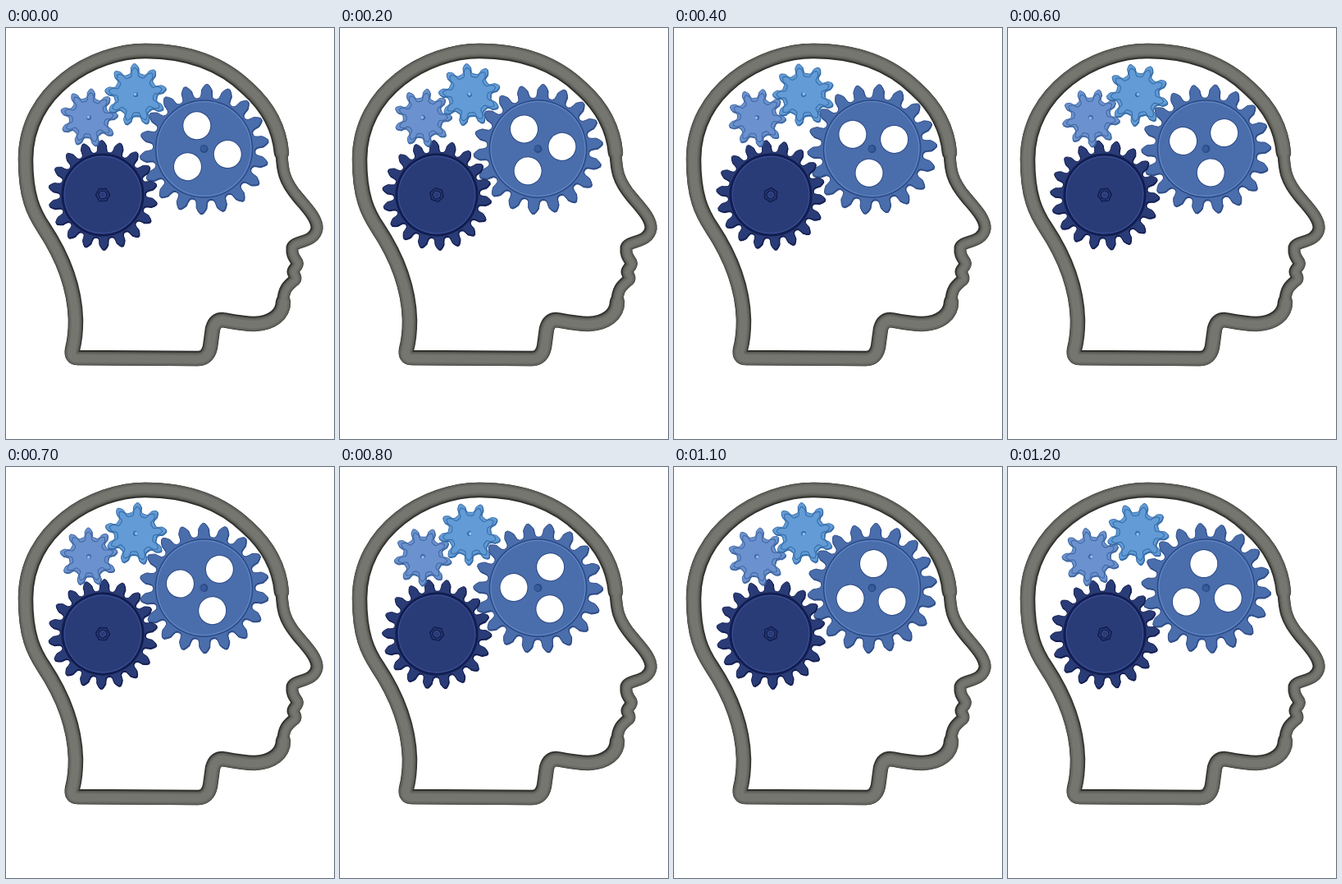
Write an HTML page with a canvas that moves like this. It is 400 px wide and 500 px high and loops after 1.3 s.

```html
<!DOCTYPE html>
<html lang="en">
<head>
<meta charset="utf-8">
<title>Thinking gears</title>
<style>
html, body { margin: 0; width: 100%; height: 100%; overflow: hidden; background: #fff; }
canvas { display: block; }
</style>
</head>
<body>
<canvas width="400" height="500"></canvas>
<script>
const ctx = document.querySelector('canvas').getContext('2d');
const LOOP = 1300, STEP = 100, TAU = Math.PI * 2;
const rad = deg => deg * Math.PI / 180;

const skull = new Path2D(`M338 333 C338 348 325 359 303 360 C290 360 280 358 264 355
  Q255 355 252 366 L249 388 Q246 402 234 402 L88 401 Q79 401 81 391
  C84 380 85 370 85 355 C84 318 72 282 46 243 C34 225 24 205 24 160
  C24 76 106 28 170 28 C220 28 262 42 295 74 C315 92 333 118 336 152`);
const face = new Path2D(`M336 152 C337 172 338 185 356 206 C366 218 380 232 379 244
  C376 262 352 258 349 267 C348 276 352 280 355 285 C357 290 349 293 350 297
  C351 301 356 304 350 308 C344 313 338 318 338 333`);

// Half of a tooth: share of the pitch, share of the tooth height.
const profile = [[.42, 0], [.31, .12], [.27, .35], [.25, .6], [.15, .83], [.05, 1]];
const tooth = [...profile.map(([a, h]) => [-a, h]), ...profile.slice().reverse()];

function outline({ n, fat }, root, tip) {
  const path = new Path2D();
  for (let i = 0; i < n; i++) {
    for (const [a, h] of tooth) {
      const angle = (i + a * fat) / n * TAU, r = root + (tip - root) * h;
      path.lineTo(r * Math.sin(angle), -r * Math.cos(angle));
    }
  }
  path.closePath();
  return path;
}

// Phases and turns per step are in degrees, clockwise from the top.
const gears = [
  { x: 241.5, y: 147, n: 18, fat: 1, root: 62, tip: 78.6, phase: 2.6, turn: -9,
    fill: '#4a6dab', edge: '#2c4a85', light: '#638ac8', detail: bigFace },
  { x: 118, y: 203, n: 18, fat: 1, root: 52, tip: 66.3, phase: -1.1, turn: 9,
    fill: '#2a3c77', edge: '#121d50', light: '#3b519a', detail: darkFace },
  { x: 101, y: 109, n: 9, fat: .82, root: 24, tip: 35, phase: 5, turn: -18,
    fill: '#6b92cf', edge: '#3d659f', light: '#8db2e6', detail: smallFace },
  { x: 158, y: 81, n: 9, fat: .82, root: 26, tip: 37.5, phase: -2, turn: 18,
    fill: '#629bd5', edge: '#336aa6', light: '#86bcec', detail: smallFace }
];
for (const g of gears) {
  g.path = outline(g, g.root, g.tip);
  g.rim = outline(g, g.root - 4, g.tip - 5);
}

function stroke(color, width, path) {
  ctx.strokeStyle = color;
  ctx.lineWidth = width;
  path ? ctx.stroke(path) : ctx.stroke();
}

function disc(x, y, r, color) {
  ctx.beginPath();
  ctx.arc(x, y, r, 0, TAU);
  ctx.fillStyle = color;
  ctx.fill();
}

function ring(r, color, width) {
  ctx.beginPath();
  ctx.arc(0, 0, r, 0, TAU);
  stroke(color, width);
}

function bigFace(g) {
  ring(59, g.edge, 1.5);
  ring(57.3, g.light, 1);
  for (let i = 0; i < 3; i++) {
    const a = rad(-19.8 + i * 120), x = 29.5 * Math.sin(a), y = -29.5 * Math.cos(a);
    disc(x, y, 17.5, g.edge);
    disc(x, y, 16.5, '#fff');
  }
  disc(0, 0, 5, g.edge);
  disc(-.5, -.5, 3.5, '#365b9c');
}

function darkFace(g) {
  ring(49, g.edge, 3);
  ring(46.8, g.light, 1);
  ctx.beginPath();
  for (let i = 0; i < 6; i++) ctx.lineTo(8.5 * Math.cos(i * TAU / 6), 8.5 * Math.sin(i * TAU / 6));
  ctx.closePath();
  stroke(g.edge, 1.6);
  ring(4.8, g.edge, 1.6);
  ring(3.6, g.light, .7);
}

function smallFace(g) {
  stroke(g.edge, 1, g.rim);
  disc(0, 0, 3, g.edge);
  disc(-.6, -.6, 2, g.light);
}

function drawGear(g, step) {
  const angle = rad(g.phase + g.turn * step);
  const at = (dx, dy) => {
    ctx.setTransform(1, 0, 0, 1, g.x + dx, g.y + dy);
    ctx.rotate(angle);
  };
  at(.5, 1);
  ctx.fillStyle = g.edge;
  ctx.fill(g.path);
  stroke(g.edge, 1, g.path);
  at(0, 0);
  ctx.fillStyle = g.fill;
  ctx.fill(g.path);
  stroke(g.edge, .8, g.path);
  g.detail(g);
  ctx.resetTransform();
}

function tube(color, shrink) {
  stroke(color, 18.5 - shrink, skull);
  stroke(color, 15 - shrink, face);
}

function drawHead() {
  tube('#30312d', 0);
  // Growing the lit layers about the middle leaves the inner edge darker.
  ctx.translate(185, 215);
  ctx.scale(1.005, 1.005);
  ctx.translate(-185, -215);
  tube('#565751', 2);
  tube('#696a64', 5);
  tube('#757670', 9);
  ctx.resetTransform();
}

function frame(now) {
  const step = Math.floor(now % LOOP / STEP);
  ctx.fillStyle = '#fff';
  ctx.fillRect(0, 0, 400, 500);
  ctx.lineJoin = ctx.lineCap = 'round';
  drawHead();
  gears.forEach(g => drawGear(g, step));
  requestAnimationFrame(frame);
}
requestAnimationFrame(frame);
</script>
</body>
</html>
```
